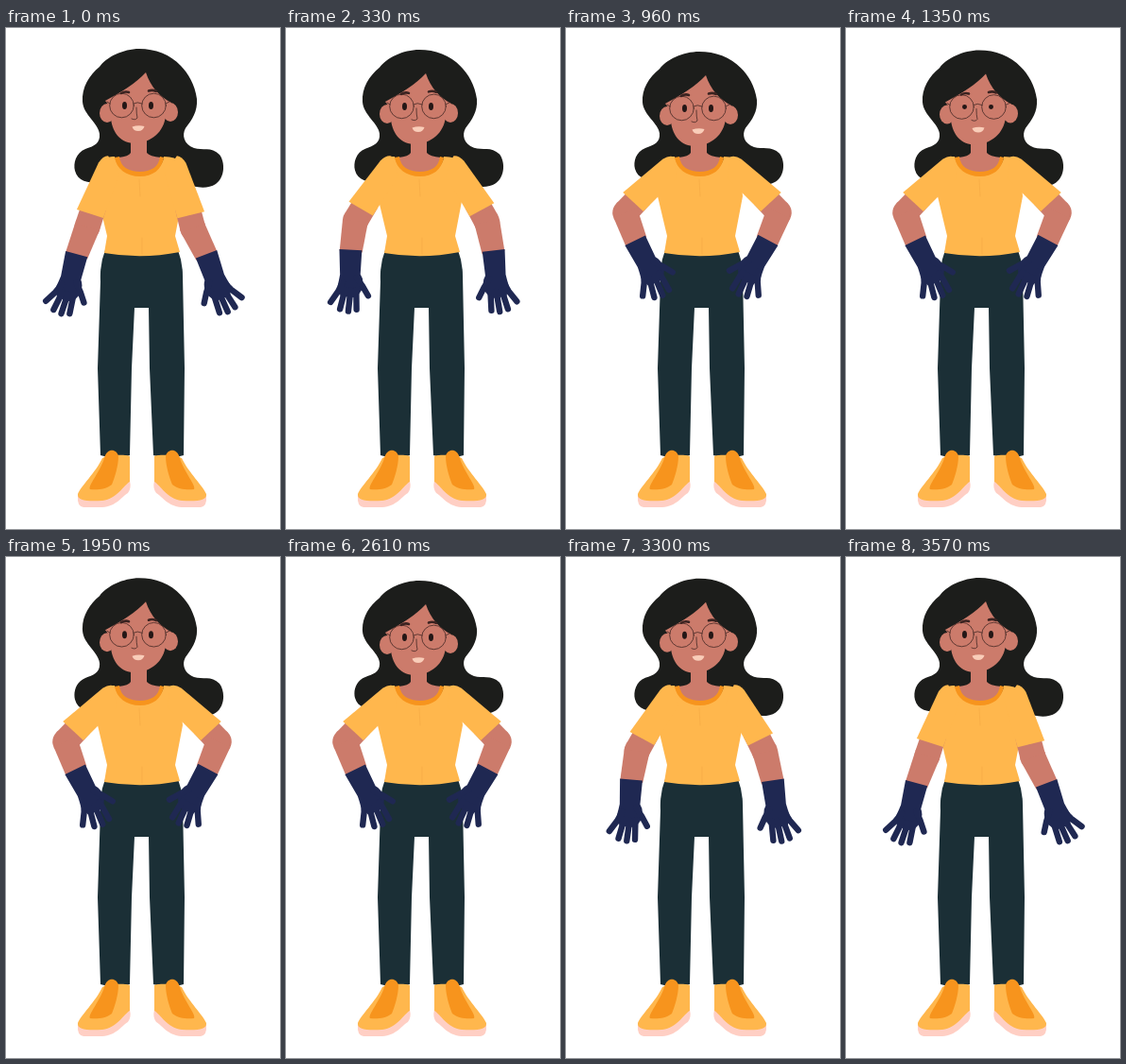
Animation, 290 px wide and 530 px high, one loop 3.6 s. Source, as an HTML page:

```html
<!DOCTYPE html>
<html lang="en">
<head>
<meta charset="utf-8">
<title>Hands on hips</title>
<style>
html, body { margin: 0; width: 100%; height: 100%; overflow: hidden; background: #fff; }
svg { display: block; width: 290px; height: 530px; }
.skin { fill: #cc7b6b; }
.hair { fill: #1c1d1b; }
.shirt { fill: #ffb74d; }
.trim { fill: #f7941d; }
.pants { fill: #1b2f36; }
.glove { fill: #1f2852; }
.line { fill: none; stroke: #3b2321; stroke-linecap: round; stroke-linejoin: round; }
</style>
</head>
<body>
<svg viewBox="0 0 290 530">
  <defs>
    <g id="shoe">
      <path fill="#ffcfc4" d="M76 495L131 479Q133 487 129 492C122 496 117 506 102 507H82Q75 506 76 495Z"/>
      <path class="shirt" d="M102 455C108 451 128 451 131 453V480C124 484 118 498 102 500C86 501 75 500 76 493C79 485 95 470 102 455Z"/>
      <path class="trim" d="M104 455C107 444 117 445 119 453C119 463 115 476 112 483C106 488 96 489 89 488C86 485 100 469 104 455Z"/>
    </g>
    <g id="upper">
      <path class="skin" d="M-14 40H12.5L13.5 64H-13.5Z"/>
      <path class="shirt" d="M-5 -14Q-10 -12 -12 -4L-16.7 50.8L12.7 49.6V0Z"/>
    </g>
    <g id="forearm">
      <circle class="skin" r="13.5"/>
      <path class="skin" d="M-13.5 0H13.5L10 33H-14Z"/>
      <path class="glove" d="M-14.4 31.5L9.5 30.7L10 56Q15 62 13 72L8 81H-9L-13 70Q-12 64 -11.5 58Z"/>
      <path fill="none" stroke="#1f2852" stroke-width="6.4" stroke-linecap="round" stroke-linejoin="round"
        d="M-8 66L-12 76L-19 88M-5 74L-8.5 94.5M1 74L.5 96M7 73L9 93.5M6 60L13 68L20 78"/>
    </g>
  </defs>

  <path id="hair" class="hair" d="M141 22C124 22 106 31 99 41C88 50 80 63 81 78C82 92 98 101 99 112C100 122 93 125 84 128C74 132 71 143 73 151C76 162 86 164 100 164L190 164C199 169 213 171 222 165C232 158 232 142 226 134C217 125 208 130 199 127C188 123 186 113 190 106C197 97 203 88 202 75C200 60 193 48 185 40C174 28 158 22 141 22Z"/>

  <path class="skin" d="M132 110H149V132Q152 136 164 137C163 148 153 154 142 154C130 154 120 148 119 137Q130 136 132 132Z"/>

  <g id="head">
    <ellipse class="skin" cx="107" cy="90" rx="8" ry="10"/>
    <ellipse class="skin" cx="174" cy="89" rx="8" ry="10"/>
    <path class="skin" d="M148 47C138 58 122 68 105 77Q111 82 111 96C113 112 122 122 137 122C154 121 167 110 169 93Q170 84 175 79C163 73 153 62 148 47Z"/>
    <path class="line" stroke-width="2.6" d="M122 69Q126 66.5 130 68M151 66.5Q155 65 159 67"/>
    <g id="eyes" fill="#241716">
      <ellipse cx="125.5" cy="82" rx="2.5" ry="4"/>
      <ellipse cx="153.5" cy="82" rx="2.5" ry="4"/>
    </g>
    <g class="line" stroke-width=".75">
      <circle cx="122.5" cy="82" r="12.8"/>
      <circle cx="156.5" cy="82" r="12.8"/>
      <path d="M135 80Q139 77.5 144 80M110 80L107 78M169 80L173 78"/>
      <path d="M138 84Q138 91 139 95Q137 98 133 96"/>
    </g>
    <path fill="#f9cdb9" d="M133.5 104.5Q140 102.5 146.5 104Q145 109 140 109Q135 109 133.5 104.5Z"/>
  </g>

  <path class="pants" d="M105 235Q99 250 100 268L97 360L100 452Q116 457 131 452L133 360L136 296H151L152 360L156 452Q172 457 188 452L189 360L187 262Q187 248 182 235Z"/>
  <use href="#shoe"/>
  <use href="#shoe" transform="translate(288 0) scale(-1 1)"/>

  <path class="shirt" d="M115 136Q106 135 103 142L97 178L107 220L104 238Q144 245 184 237L179 220L187 178L184 142Q180 136 167 136C166 147 156 154 142 154C128 154 118 147 115 136Z"/>
  <path class="trim" d="M115 137L120 136C121 147 130 152 142 152C153 152 162 147 163 136L167 137C165 150 155 157 142 157C127 157 117 149 115 137Z"/>
  <path class="line" style="stroke:#f5ab45" stroke-width=".7" d="M141 160L142 178M144 222V239"/>

  <g transform="translate(108 150)"><g class="arm"></g></g>
  <g transform="translate(180 150) scale(-1 1)"><g class="arm"></g></g>
</svg>
<script>
const LOOP = 3600, MOVE = 900, BOB = 1800, BLINK = 1290;
const $ = id => document.getElementById(id);
const clamp = x => Math.max(0, Math.min(1, x));
const ease = x => (1 - Math.cos(Math.PI * clamp(x))) / 2;
const mix = ([a, b], p) => a + (b - a) * p;

// Arm angles in degrees from straight down, outward positive: [at rest, on hips]
const poses = [
  { upper: [20, 45], fore: [17, -24] },
  { upper: [16, 45], fore: [23, -26] }
];
const arms = [...document.querySelectorAll('.arm')].map((shoulder, i) => {
  shoulder.innerHTML = '<use href="#upper"/><g><use href="#forearm"/></g>';
  return { shoulder, elbow: shoulder.lastChild, ...poses[i] };
});

function draw(t) {
  const raise = ease(t / MOVE) - ease((t - LOOP + MOVE) / MOVE);
  for (const arm of arms) {
    const upper = mix(arm.upper, raise * (2 - raise));
    const fore = mix(arm.fore, raise);
    arm.shoulder.setAttribute('transform', `rotate(${upper})`);
    arm.elbow.setAttribute('transform', `translate(0 64) rotate(${fore - upper})`);
  }

  const phase = t % BOB;
  const drop = 1.5 * (1 - Math.cos(2 * Math.PI * phase / BOB));
  $('head').setAttribute('transform', `translate(0 ${drop})`);
  $('hair').setAttribute('transform', `translate(0 100) scale(1 ${1 - drop / 78}) translate(0 -100)`);

  const open = clamp(0.1 + Math.abs(phase - BLINK) / 120);
  $('eyes').setAttribute('transform', `translate(0 82) scale(1 ${open}) translate(0 -82)`);
}

function tick() {
  draw(performance.now() % LOOP);
  requestAnimationFrame(tick);
}
tick();
</script>
</body>
</html>
```
